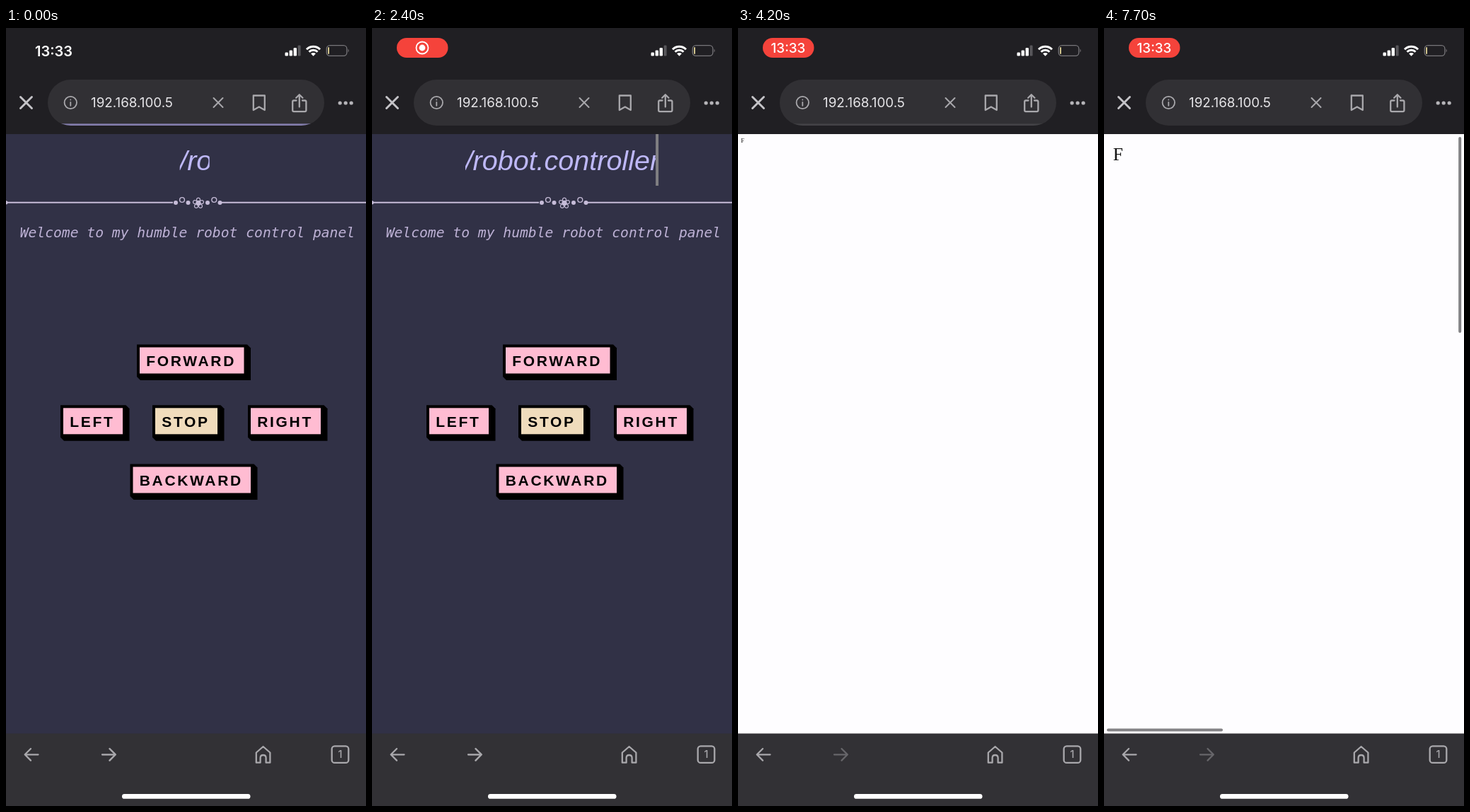
These frames come from a looping animation (509 by 1100 pixels, 7800 ms). An HTML page:

```html
<!DOCTYPE html>
<html lang="en">
<head>
<meta charset="utf-8">
<title>Robot controller</title>
<style>
html, body { margin: 0; width: 100%; height: 100%; overflow: hidden; background: #313146; }
svg { position: absolute; left: 0; top: 0; display: block; }
.ui { font-family: Inter, Roboto, sans-serif; }
.line { fill: none; stroke: #a9a8ac; stroke-width: 2.3; stroke-linecap: round; stroke-linejoin: round; }
.sub { font: italic 19.66px "DejaVu Sans Mono", monospace; fill: #beb2d6; }
.label { font: bold 21px "Liberation Sans", Arial, sans-serif; letter-spacing: 2.65px; }

.title {
  position: absolute; left: 268.5px; top: 150px; height: 73px; transform: translateX(-50%);
  overflow: hidden; white-space: nowrap; color: #beb8f8; border-right: 4px solid transparent;
  font: italic 39.5px/74.6px "Liberation Sans", Arial, sans-serif;
}

/* every animation spans one loop */
.title, .anim { animation: 7.8s linear infinite; }
.title { animation-name: type, caret, leave; animation-timing-function: linear, step-end, step-end; }
.dark { animation-name: leave; animation-timing-function: step-end; }
.white { animation-name: enter; animation-timing-function: step-end; }
.press { animation-name: press; animation-timing-function: step-end; }
.clock { animation-name: clock; }
.pill { animation-name: pill; }
.rec { animation-name: rec; }
.time { animation-name: time; }
.load { animation-name: load; }
.done { animation-name: done; }
.zoom { animation-name: zoom; transform-origin: 0 0; }
.bars { animation-name: bars; }

@keyframes type {
  0% { width: 42.6px; animation-timing-function: steps(34, end); }
  32.37%, 100% { width: 284px; }
}
@keyframes caret {
  0%, 3.53%, 13.14%, 22.76%, 32.37%, 41.99%, 51.6%, 100% { border-right-color: transparent; }
  1.28%, 8.33%, 17.95%, 27.56%, 37.18%, 46.79% { border-right-color: #807f82; }
}
@keyframes leave { 0% { visibility: visible; } 53.8%, 100% { visibility: hidden; } }
@keyframes enter { 0% { visibility: hidden; } 53.8%, 100% { visibility: visible; } }
@keyframes press { 0% { opacity: 0; } 50%, 100% { opacity: .22; } }
@keyframes clock { 0%, 3.8% { opacity: 1; } 6%, 100% { opacity: 0; } }
@keyframes pill { 0%, 3.8% { opacity: 0; } 7.7%, 100% { opacity: 1; } }
@keyframes rec { 0%, 41% { opacity: 1; } 43.6%, 100% { opacity: 0; } }
@keyframes time { 0%, 41% { opacity: 0; } 43.6%, 100% { opacity: 1; } }
@keyframes load { 0%, 1.3% { opacity: 1; } 5%, 100% { opacity: 0; } }
@keyframes done { 0%, 53.79% { opacity: 0; } 53.8% { opacity: 1; } 56.5%, 100% { opacity: 0; } }
@keyframes zoom {
  0%, 62.82% { transform: translate(0, 150px) scale(1); animation-timing-function: ease-in; }
  71.79% { transform: translate(32px, 176px) scale(2.4); animation-timing-function: ease-out; }
  76.92%, 92.95% { transform: translate(53px, 192px) scale(3.05); animation-timing-function: ease-out; }
  98.08%, 100% { transform: translate(0, 150px) scale(3.06); }
}
@keyframes bars { 0%, 93.5% { opacity: 0; } 95%, 100% { opacity: 1; } }
</style>
</head>
<body>
<svg width="509" height="1100" viewBox="0 0 509 1100">
  <defs>
    <clipPath id="box"><rect x="59" y="73" width="391" height="65" rx="32.5"/></clipPath>
  </defs>

  <g class="anim dark">
    <rect y="150" width="509" height="848" fill="#313146"/>
    <g fill="#c6bcd8">
      <path d="M0 246.8H236M305 246.8H509" stroke="#c6bcd8" stroke-width="2"/>
      <circle cx="0" cy="246.8" r="2.6"/>
      <circle cx="240" cy="247" r="3"/>
      <circle cx="257.5" cy="247" r="3"/>
      <circle cx="285" cy="247" r="3"/>
      <circle cx="302.5" cy="247" r="3"/>
      <g fill="none" stroke="#c6bcd8" stroke-width="1.4">
        <circle cx="249" cy="243" r="3.4"/>
        <circle cx="294.3" cy="243" r="3.4"/>
      </g>
      <text x="272" y="254.5" text-anchor="middle" font-size="22" font-family="DejaVu Sans, sans-serif">❀</text>
    </g>
    <text class="sub" x="19.7" y="296">Welcome to my humble robot control panel</text>
    <g id="pad"></g>
    <rect class="anim press" x="184" y="447" width="162" height="51"/>
  </g>

  <g class="anim white">
    <rect y="150" width="509" height="848" fill="#fefdff"/>
    <g class="anim zoom">
      <text x="4.15" y="12.1" font-size="8.31" fill="#111" font-family="Liberation Serif, Times, serif">F</text>
    </g>
    <g class="anim bars" fill="#838285">
      <rect x="501.2" y="154" width="4" height="277" rx="2"/>
      <rect x="4" y="990.5" width="164" height="4" rx="2"/>
    </g>
  </g>

  <!-- status bar -->
  <rect width="509" height="150" fill="#201f23"/>
  <text class="ui anim clock" x="67.5" y="40" text-anchor="middle" font-size="20" font-weight="600" fill="#fff">13:33</text>
  <g class="anim pill">
    <rect x="35" y="14" width="72.5" height="28" rx="14" fill="#f5433b"/>
    <g class="anim rec">
      <circle cx="71" cy="28" r="8.5" fill="none" stroke="#fff" stroke-width="1.8"/>
      <circle cx="71" cy="28" r="4.4" fill="#fff"/>
    </g>
    <text class="ui anim time" x="71" y="35" text-anchor="middle" font-size="18.8" font-weight="500" fill="#fff">13:33</text>
  </g>
  <g fill="#fff">
    <rect x="394.5" y="34.5" width="4.4" height="5" rx="1.2"/>
    <rect x="400.6" y="31.5" width="4.4" height="8" rx="1.2"/>
    <rect x="406.6" y="28" width="4.4" height="11.5" rx="1.2"/>
    <rect x="412.6" y="24.5" width="4" height="15" rx="1.2" fill="#57565a"/>
    <path d="M434.5 39.8L431.1 36.3A4.8 4.8 0 0 1 437.9 36.3Z"/>
    <path d="M428.5 33.8A8.5 8.5 0 0 1 440.5 33.8M425 30.3A13.4 13.4 0 0 1 444 30.3" fill="none" stroke="#fff" stroke-width="3"/>
  </g>
  <rect x="453.3" y="24.6" width="28.6" height="14.8" rx="4.6" fill="none" stroke="#77767a" stroke-width="1.3"/>
  <rect x="455.2" y="27" width="1.8" height="10" rx=".9" fill="#e5d79a"/>
  <path d="M483.6 29.5Q486 32 483.6 34.5Z" fill="#77767a"/>

  <!-- address bar -->
  <g clip-path="url(#box)">
    <rect x="59" y="73" width="391" height="65" fill="#313034"/>
    <rect class="anim load" x="59" y="135.3" width="391" height="3" fill="#827cab"/>
    <rect class="anim done" x="59" y="135.3" width="391" height="3" fill="#444347"/>
  </g>
  <path class="line" d="M20.5 97.5L36.5 113.5M36.5 97.5L20.5 113.5" style="stroke:#c5c4c8;stroke-width:2.9"/>
  <g class="line" style="stroke-width:1.8">
    <circle cx="91.3" cy="105.5" r="8.7"/>
    <path d="M91.3 105V109.8M91.3 101.4V101.5"/>
  </g>
  <text class="ui" x="120" y="112.3" font-size="18.8" fill="#e6e5e8">192.168.100.5</text>
  <g class="line">
    <path d="M293.5 99L306.5 112M306.5 99L293.5 112" stroke-width="2"/>
    <path d="M349.8 95.5H365.8V116L357.8 111.5L349.8 116Z"/>
    <path d="M410.5 102.5H407Q405.2 102.5 405.2 104.3V116.3Q405.2 118.2 407 118.2H422.5Q424.4 118.2 424.4 116.3V104.3Q424.4 102.5 422.5 102.5H419M414.8 111.5V94.5M410.2 98.7L414.8 94.2L419.4 98.7"/>
  </g>
  <g fill="#b5b4b8">
    <circle cx="472.2" cy="106" r="2.6"/>
    <circle cx="480.2" cy="106" r="2.6"/>
    <circle cx="488.2" cy="106" r="2.6"/>
  </g>

  <!-- bottom bar -->
  <rect y="997.5" width="509" height="102.5" fill="#323135"/>
  <g class="line">
    <path d="M45.5 1027.3H27M35 1019L26.7 1027.3L35 1035.6"/>
    <path id="next" d="M136 1027.3H154.5M146.5 1019L154.8 1027.3L146.5 1035.6" stroke="#67666a"/>
    <path class="anim dark" d="M136 1027.3H154.5M146.5 1019L154.8 1027.3L146.5 1035.6"/>
    <path d="M353.8 1024.5L363.6 1016L373.4 1024.5V1038.7H367.6V1032Q367.6 1028 363.6 1028Q359.6 1028 359.6 1032V1038.7H353.8Z"/>
    <rect x="460.7" y="1015.3" width="23.6" height="23.6" rx="4"/>
  </g>
  <text class="ui" x="472.5" y="1032.3" text-anchor="middle" font-size="14.5" font-weight="500" fill="#a9a8ac">1</text>
  <rect x="164" y="1083" width="181.5" height="6.8" rx="3.4" fill="#fff"/>
</svg>
<div class="title">/robot.controller</div>
<script>
// Extruded keys: label, left, top, total width, face colour
const pink = '#ffbcd2', sand = '#f0dcbc';
const keys = [
  ['FORWARD', 185, 447.5, 161, pink],
  ['LEFT', 77, 533.3, 97.5, pink],
  ['STOP', 207, 533.3, 101.5, sand],
  ['RIGHT', 342, 533.3, 112.5, pink],
  ['BACKWARD', 175.5, 616.5, 180, pink]
];
document.getElementById('pad').innerHTML = keys.map(([name, x, y, w, fill]) => `
  <path d="M${x} ${y}h${w - 5}l5 5v45.5h${5 - w}l-5 -5z"/>
  <rect x="${x + 4}" y="${y + 4}" width="${w - 13.5}" height="37" fill="${fill}"/>
  <text class="label" x="${x + 13.3}" y="${y + 30.5}">${name}</text>`).join('');
document.getElementById('next').style.stroke = '#67666a';
</script>
</body>
</html>
```
